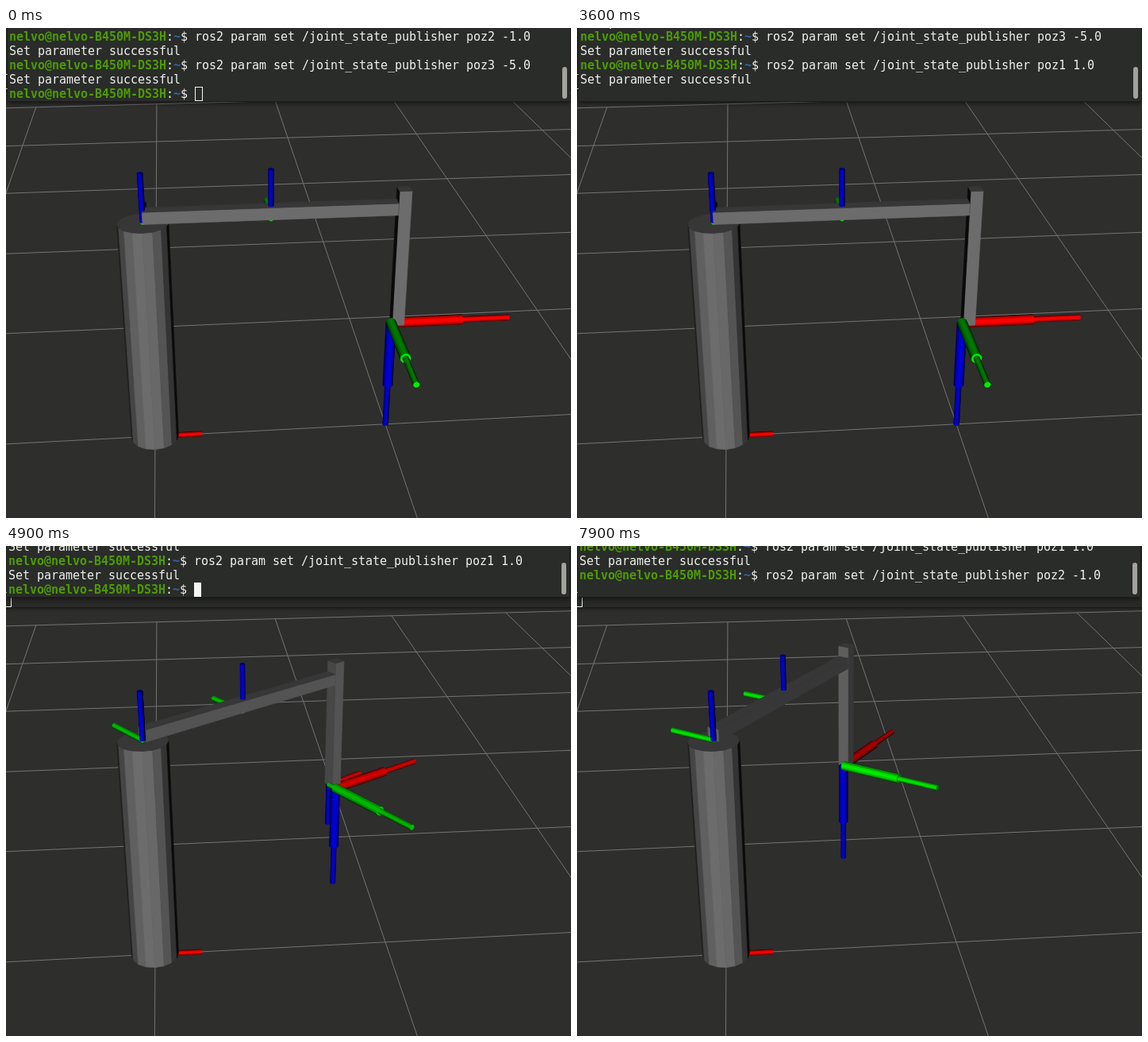
Recreate the animation shown at these times as an HTML page with a canvas. Size 712 by 617 pixels, loop 8 s.

```html
<!DOCTYPE html>
<html lang="en">
<head>
<meta charset="utf-8">
<title>Robot arm driven from a terminal</title>
<style>
  html, body { margin: 0; width: 100%; height: 100%; overflow: hidden; background: #2e2e2d; }
  #stage { position: relative; width: 712px; height: 617px; overflow: hidden; }
  #stage > * { position: absolute; }
  canvas { left: 0; top: 0; }
  #back { left: -10px; top: -10px; width: 732px; height: 87px; background: #292a28;
    border-bottom: 1px solid #1a1a1a; box-shadow: 0 1px 5px rgba(0,0,0,.45); }
  #mark { left: -3px; top: 58px; width: 8px; height: 17px; border: 1px solid #eee; }
  #term { left: 2px; top: -10px; width: 709px; height: 102px; overflow: hidden; background: #292c29;
    border-bottom: 1px solid #1b1c1b; box-shadow: 0 2px 6px rgba(0,0,0,.55); }
  #bar { position: absolute; left: 699px; top: 59px; width: 6px; height: 40px; border-radius: 3px; background: #a3a29e; }
  pre { position: absolute; left: 2px; bottom: 0; margin: 0; color: #f0f0ee;
    font: 15px/18px "DejaVu Sans Mono", monospace; letter-spacing: -.03px; }
  pre div { height: 18px; }
  b { color: #4e9a06; }
  b + b, .path { color: #3465a4; }
  i { display: inline-block; width: 9px; height: 18px; vertical-align: top; }
  i.solid { background: #f4f6f6; }
  i.hollow { width: 10px; box-shadow: inset 0 0 0 1px #f4f6f6; }
</style>
</head>
<body>
<div id="stage">
  <canvas width="712" height="617"></canvas>
  <div id="back"></div>
  <div id="mark"></div>
  <div id="term"><pre></pre><div id="bar"></div></div>
</div>
<script>
const LOOP = 8000;
const ctx = document.querySelector('canvas').getContext('2d');
const term = document.getElementById('term');
const screen = document.querySelector('pre');

// ---- camera -------------------------------------------------------------
const SIN_PITCH = .45, COS_PITCH = .893, SIN_YAW = .094, COS_YAW = .9956, FOCAL = 1362;

function toCamera([x, y, z]) {
  const right = COS_YAW * x - SIN_YAW * y;
  const ahead = SIN_YAW * x + COS_YAW * y;
  return [
    right - .5037,
    .5716 - SIN_PITCH * ahead - COS_PITCH * z,
    4.634 + COS_PITCH * ahead - SIN_PITCH * z
  ];
}
const toScreen = ([x, y, z]) => [336 + FOCAL * x / z, 346 + FOCAL * y / z];

// ---- solids -------------------------------------------------------------
const sub = (a, b) => a.map((v, i) => v - b[i]);
const dot = (a, b) => a[0] * b[0] + a[1] * b[1] + a[2] * b[2];
const cross = (a, b) => [
  a[1] * b[2] - a[2] * b[1], a[2] * b[0] - a[0] * b[2], a[0] * b[1] - a[1] * b[0]
];
const turn = angle => ([x, y, z]) => [
  x * Math.cos(angle) - y * Math.sin(angle), x * Math.sin(angle) + y * Math.cos(angle), z
];

function tracePath(points) {
  ctx.beginPath();
  points.forEach(p => ctx.lineTo(...toScreen(p)));
}

// Convex prism between two rings, lit from the camera.
function prism(angle, ringA, ringB, rgb) {
  const place = turn(angle);
  const [a, b] = [ringA, ringB].map(ring => ring.map(p => toCamera(place(p))));
  const all = [...a, ...b];
  const centre = [0, 1, 2].map(i => all.reduce((sum, p) => sum + p[i], 0) / all.length);
  const sides = a.map((p, i) => {
    const next = (i + 1) % a.length;
    return [p, a[next], b[next], b[i]];
  });
  for (const face of [...sides, a, b]) {
    let normal = cross(sub(face[1], face[0]), sub(face[2], face[0]));
    if (dot(normal, sub(face[0], centre)) < 0) normal = normal.map(v => -v);
    if (dot(normal, face[0]) >= 0) continue;
    const light = Math.max(0, -normal[2] / Math.hypot(...normal));
    ctx.fillStyle = ctx.strokeStyle = `rgb(${rgb.map(v => Math.min(255, Math.round(v * light)))})`;
    ctx.lineWidth = .6;
    tracePath(face);
    ctx.closePath();
    ctx.fill();
    ctx.stroke();
  }
}

function box(angle, x0, x1, halfWidth, z0, z1) {
  const ring = z => [[x0, -halfWidth, z], [x1, -halfWidth, z], [x1, halfWidth, z], [x0, halfWidth, z]];
  prism(angle, ring(z0), ring(z1), GREY);
}

function tube(angle, origin, axis, from, to, radius, rgb, sides = 14) {
  const ring = offset => Array.from({ length: sides }, (_, k) => {
    const p = [...origin], a = k / sides * 2 * Math.PI;
    p[axis] += offset;
    p[(axis + 1) % 3] += radius * Math.cos(a);
    p[(axis + 2) % 3] += radius * Math.sin(a);
    return p;
  });
  prism(angle, ring(from), ring(to), rgb);
}

// ---- scene --------------------------------------------------------------
const GREY = [122, 122, 122], RED = [262, 0, 0], GREEN = [0, 268, 0], BLUE = [0, 0, 250];
const X = 0, Y = 1, Z = 2;
const TIP = [1, 0, .5];

function drawGrid() {
  ctx.strokeStyle = '#747474';
  ctx.lineWidth = 1;
  const line = (p, q) => { tracePath([toCamera(p), toCamera(q)]); ctx.stroke(); };
  for (let i = -5; i <= 5; i++) line([i, -1, 0], [i, 5, 0]);
  for (let i = 0; i <= 5; i++) line([-5, i, 0], [5, i, 0]);
}

function drawShoulderAxes(angle) {
  tube(angle, [0, 0, .99], Y, 0, .2, .01, GREEN);
  tube(angle, [0, 0, .99], Z, 0, .2, .01, BLUE);
}

// The small tip frame follows the arm; the large one trails it.
function drawTipAxis(angle, trailing, axis, sign, rgb) {
  const thin = () => tube(trailing, TIP, axis, .3 * sign, .5 * sign, .0115, rgb);
  tube(angle, TIP, axis, 0, .2 * sign, .01, rgb);
  if (axis !== Y) thin();
  tube(trailing, TIP, axis, 0, .3 * sign, .0205, rgb);
  if (axis === Y) thin();
}

function drawScene(angle, trailing) {
  ctx.fillStyle = '#2e2e2d';
  ctx.fillRect(0, 0, 712, 617);
  drawGrid();
  tube(0, [0, 0, 0], X, 0, .2, .01, RED);
  tube(0, [0, 0, 0], Z, 0, .985, .1, GREY, 16);

  const endVisible = angle > .035;
  if (!endVisible) drawShoulderAxes(angle);
  tube(angle, [.5, 0, .985], Y, 0, .2, .01, GREEN);
  drawTipAxis(angle, trailing, X, 1, RED);
  box(angle, 1, 1.05, .025, .5, 1.09);
  box(angle, 0, 1, .025, .99, 1.04);
  if (endVisible) drawShoulderAxes(angle);
  for (const x of [0, .5]) tube(angle, [x, 0, 1.04], Z, 0, .15, .01, BLUE);
  drawTipAxis(angle, trailing, Z, -1, BLUE);
  drawTipAxis(angle, trailing, Y, -1, GREEN);
}

const armAngle = step => Math.min(.95, Math.max(0, .0475 * (step - 36.16)));

// ---- terminal -----------------------------------------------------------
const PROMPT = '<b>nelvo@nelvo-B450M-DS3H</b>:<b class="path">~</b>$ ';
const command = args => PROMPT + 'ros2 param set /joint_state_publisher ' + args;
const DONE = 'Set parameter successful';
const before = [command('poz2 -1.0'), DONE, command('poz3 -5.0'), DONE];
const sent = [...before, command('poz1 1.0')];
const after = [...sent, DONE];

// [start, finished lines, current line, cursor]
const states = [
  [0, before, PROMPT, 'hollow'],
  [200, before, PROMPT, 'solid'],
  [1100, before, command('poz3 -5.0'), 'solid'],
  [1200, before, command('poz2 -1.0'), 'solid'],
  [1300, before, command('poz1 0.0'), 'solid'],
  [1500, before, command('poz1 '), 'solid'],
  [1800, before, command('poz1 1'), 'solid'],
  [2100, before, command('poz1 1.0'), 'solid'],
  [2800, sent, '', 'solid'],
  [3400, sent, '', ''],
  [3600, after, '', ''],
  [3700, after, PROMPT, 'solid'],
  [6100, after, command('poz1 1.0'), 'solid'],
  [6400, after, command('poz3 -5.0'), 'solid'],
  [6600, after, command('poz2 -1.0'), 'solid'],
  [7200, [...after, command('poz2 -1.0')], '', 'solid'],
  [7900, [...after, command('poz2 -1.0')], '', '']
];
let shown;

function drawTerminal(t) {
  const state = states.findLast(s => s[0] <= t);
  if (state !== shown) {
    const [, lines, current, cursor] = shown = state;
    screen.innerHTML = [...lines, `${current}<i class="${cursor}"></i>`]
      .map(line => `<div>${line}</div>`).join('');
  }
  const moved = Math.min(1, Math.max(0, (t - 3900) / 400));
  term.style.transform = `translate(${Math.round(-moved)}px, ${Math.round(-28 * moved)}px)`;
}

// ---- clock --------------------------------------------------------------
const start = performance.now();
function frame() {
  const t = (performance.now() - start) % LOOP;
  const step = Math.floor(t / 100);
  drawScene(armAngle(step), armAngle(step - 1));
  drawTerminal(step * 100);
  requestAnimationFrame(frame);
}
frame();
</script>
</body>
</html>
```
